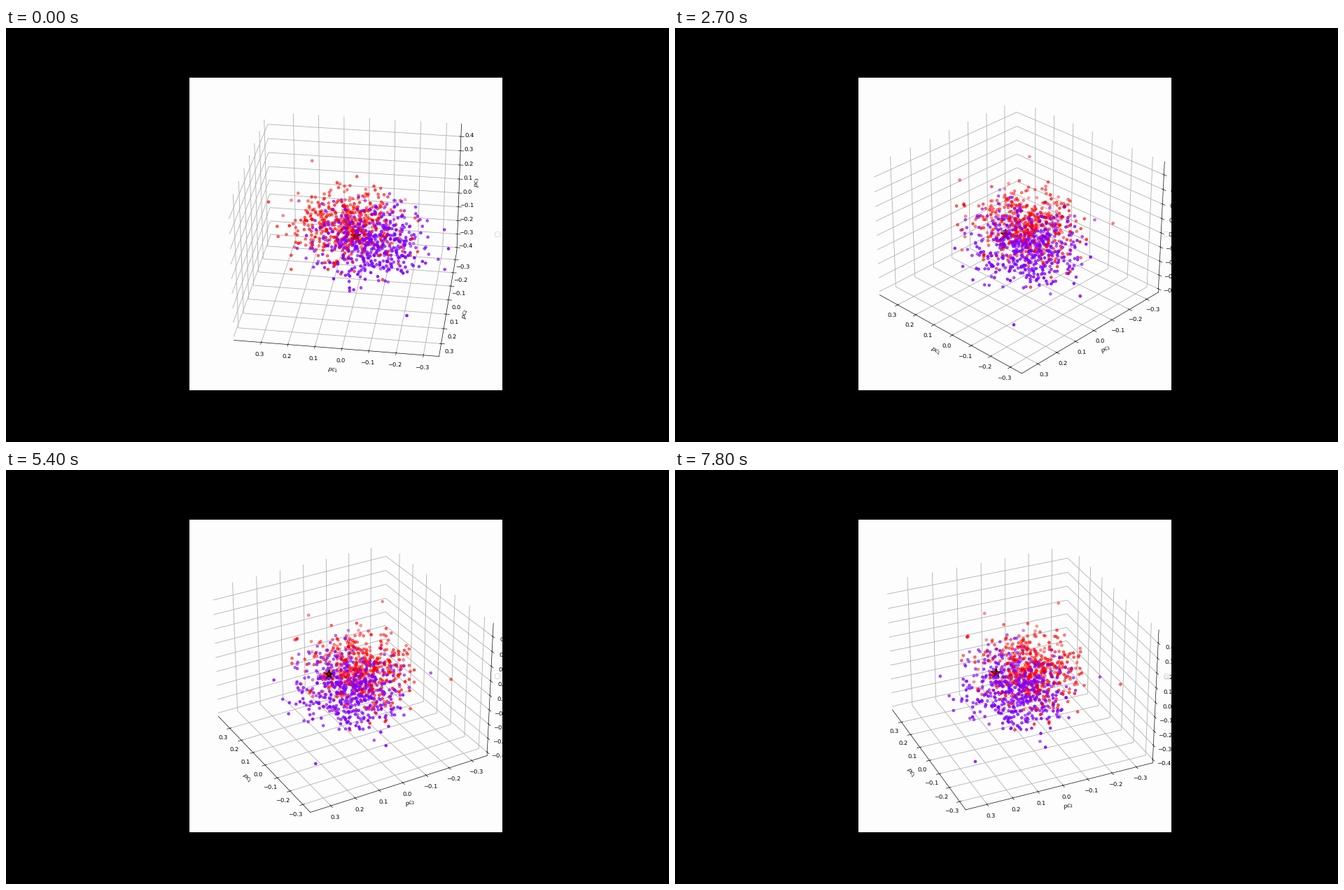
A matplotlib script for the animation above (8 s loop, 947x592 px).

```python
import numpy as np
import matplotlib.pyplot as plt
from matplotlib.animation import FuncAnimation
from matplotlib.patches import Rectangle

W, H, DPI = 947, 592, 60
LEFT, BOTTOM, SIDE = 262, 74, 447
TICK, STEP, POSES = 100, 3, 27   # ms per frame, frames per pose, poses per loop

RED, PURPLE = (1, 0, 0), (0.5, 0, 1)
SPREAD = (.1, .088, .1)

# The camera swings at an even pace between a few turning points.
TURN_POSE = [0, 9, 15, 20, 23, 26]
TURN_AZIM = [98, 134, 88, 192, 152, 156]

plt.rcParams.update({"text.hinting": "none", "grid.linewidth": 1})
rng = np.random.default_rng(7)


def cover(x, y, w, h):
    """Black border that cuts labels off at the edge of the white square."""
    fig.add_artist(Rectangle((x / W, y / H), w / W, h / H, color="black",
                             lw=0, antialiased=False, zorder=10))


fig = plt.figure(figsize=(W / DPI, H / DPI), dpi=DPI, facecolor="black")
ax = fig.add_axes([LEFT / W, BOTTOM / H, SIDE / W, SIDE / H],
                  projection="3d", facecolor="#fdfdfd")

count = 490
red = rng.normal((.048, -.045, .012), SPREAD, (count, 3))
purple = rng.normal((-.062, .062, .002), SPREAD, (count, 3))
ax.scatter(*np.vstack([red, purple]).T, s=20,
           c=[RED] * count + [PURPLE] * count)
ax.scatter([-.013], [.118], [.095], color="black", marker="*", s=380)

side_ticks = np.arange(-3, 4) / 10
ax.set(xlim=(-.357, .4025), ylim=(-.368, .383), zlim=(-.425, .487),
       xticks=side_ticks, yticks=side_ticks, zticks=np.arange(-4, 5) / 10,
       xlabel="$pc_1$", ylabel="$pc_2$", zlabel="$pc_3$")
for axis in (ax.xaxis, ax.yaxis, ax.zaxis):
    axis.set_pane_color((1, 1, 1, 0))
ax.legend(handles=[], loc="center right")

right, top = LEFT + SIDE, BOTTOM + SIDE
cover(0, 0, LEFT, H)
cover(right, 0, W - right, H)
cover(0, 0, W, BOTTOM)
cover(0, top, W, H - top)


def update(frame):
    pose = min(frame // STEP, POSES - 1)
    ax.view_init(elev=30, azim=np.interp(pose, TURN_POSE, TURN_AZIM))
    return []


anim = FuncAnimation(fig, update, frames=80, interval=TICK, repeat=True,
                     repeat_delay=0, blit=False)
plt.show()
```
